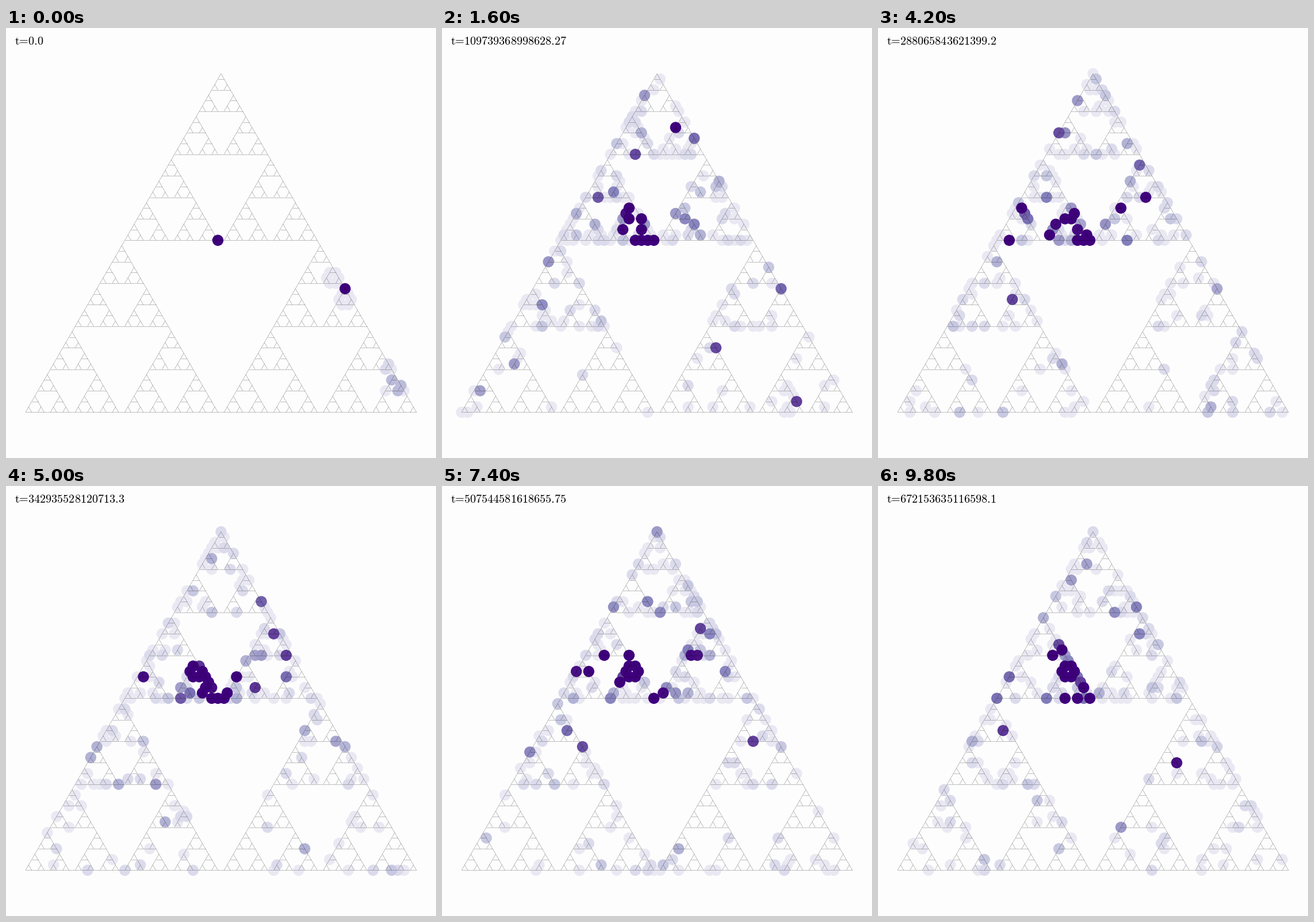
A matplotlib script that plays this animation: 748x748 px, repeating every 10 s.

```python
import numpy as np
import matplotlib.pyplot as plt
from matplotlib.animation import FuncAnimation
from matplotlib.collections import LineCollection

SIZE, DPI = 748, 100
FRAMES, INTERVAL = 50, 200
DT = 205761316872428 / 15
SIDE = 64                      # nodes along one side of the graph
WIDTH = SIZE / 1.1
STEP = WIDTH / (SIDE - 1)
RISE = STEP * np.sqrt(3) / 2
LEFT, BOTTOM = (SIZE - WIDTH) / 2, SIZE / 2 + RISE * (SIDE - 1) / 2
FULL = 12                      # particles for the darkest colour

plt.rcParams["mathtext.fontset"] = "cm"
purples = plt.get_cmap("Purples")

# Nodes of the triangular graph: the bits of column and row never overlap.
nodes = [(i, r) for r in range(SIDE) for i in range(SIDE - r) if i & r == 0]
index = {node: k for k, node in enumerate(nodes)}
xy = np.array([(LEFT + STEP * (i + r / 2), BOTTOM - RISE * r) for i, r in nodes])
edges = [(xy[k], xy[index[i + a, r + b]])
         for (i, r), k in index.items()
         for a, b in ((1, 0), (0, 1), (1, -1)) if (i + a, r + b) in index]


def distance(x, y):
    return np.hypot(*(xy - (x, y)).T)


def near(points):
    return [int(np.argmin(distance(*p))) for p in points]


def ring(x, y):
    """Six nodes around a hexagonal hole."""
    return near((x + STEP * np.cos(a), y + STEP * np.sin(a))
                for a in np.arange(6) * np.pi / 3)


def row(x, y, n):
    return near((x + STEP * k, y) for k in range(n))


def smooth(u):
    u = np.clip(u, 0, 1)
    return u * u * (3 - 2 * u)


def occupancy(i, r):
    """Chance that a node holds at least one stray particle."""
    if r >= 32:
        return 0.4
    if i < 32:
        return 0.29 if r >= 16 else 0.15
    return 0.07 if i + r < 48 else 0.18


SOURCES = near([(369, 370), (590, 453)])
FLOOR = row(336, 370, 4)       # holds the cluster in the first half
NEST = ring(331, 323)          # holds it in the second half

chance = np.array([occupancy(i, r) for i, r in nodes])
spread = distance(342, 340)
chance = np.where(spread < 48, 0.6, chance)
pile = 0.3 + 0.3 * np.exp(-spread / 90)


def start():
    load = np.zeros(len(nodes))
    load[ring(568, 435) + ring(590, 472)] = 1
    load[near([(671, 593), (660, 631), (693, 631)])] = 1
    load[near([(665, 585), (660, 593)])] = 2
    load[near([(671, 612), (687, 622), (682, 631)])] = 3.6
    load[SOURCES] = FULL
    return load


def counts(n):
    if n == 0:
        return start()
    rng = np.random.default_rng(300 + n)
    stray = np.minimum(rng.geometric(1 - pile), 6)
    load = np.where(rng.random(len(nodes)) < chance, stray, 0.0)

    def scatter(number, reach, low, high):
        weight = np.exp(-spread / reach)
        chosen = rng.choice(len(nodes), number, replace=False, p=weight / weight.sum())
        load[chosen] = np.maximum(load[chosen], rng.uniform(low, high, number))

    scatter(14, 75, 4.5, 9)
    scatter(6, 20, 10, FULL)
    scatter(3, 90, 10, FULL)

    # The cluster climbs node by node from the floor into the nest.
    moved = smooth((n - 10) / 22)
    for k, node in enumerate(FLOOR):
        if moved <= (k + 2) / 5:
            load[node] = FULL
    for k, node in enumerate(NEST):
        if moved > (k + 0.5) / 6:
            load[node] = FULL

    drained = SOURCES[1]
    load[drained] = max(load[drained], FULL / (1 + n / 12))
    return load


fig = plt.figure(figsize=(SIZE / DPI, SIZE / DPI), dpi=DPI, facecolor="#fdfdfd")
ax = fig.add_axes([0, 0, 1, 1])
ax.set(xlim=(0, SIZE), ylim=(SIZE, 0))
ax.axis("off")
dots = ax.scatter([], [], s=195, linewidths=0, zorder=1)
ax.add_collection(LineCollection(edges, colors="black", alpha=0.35,
                                 linewidths=0.5, zorder=2))
clock = ax.text(15, 29, "", fontsize=14.5, va="baseline", color="black")


def draw(n):
    load = counts(n)
    order = np.argsort(load, kind="stable")
    order = order[load[order] > 0]
    dots.set_offsets(xy[order])
    dots.set_facecolor(purples(np.minimum(0.16 + 0.085 * (load[order] - 1), 1.0)))
    gap = r"\hspace{-0.2}"
    clock.set_text(rf"$\mathrm{{t}}{gap}={gap}\mathrm{{{float(n * DT)}}}$")
    return dots, clock


anim = FuncAnimation(fig, draw, frames=FRAMES, interval=INTERVAL,
                     init_func=lambda: draw(0), repeat=True, repeat_delay=0)
plt.show()
```
